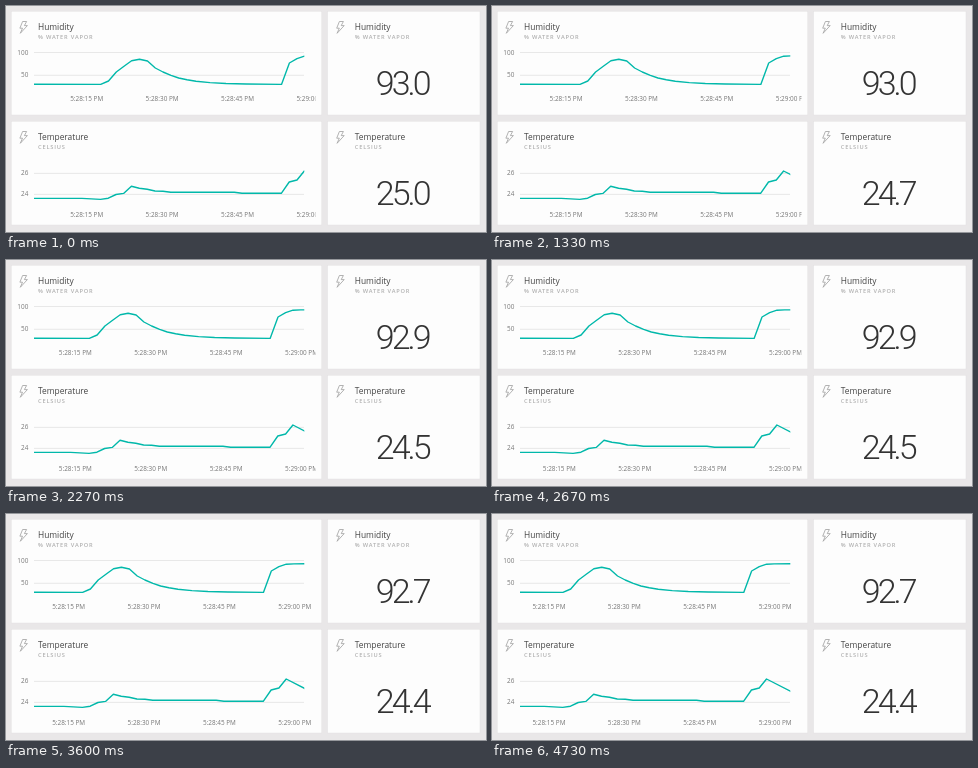
These frames come from a looping animation (480 by 226 pixels, 4.79 s). An HTML page:

```html
<!DOCTYPE html>
<html lang="en">
<head>
<meta charset="utf-8">
<title>Sensor dashboard</title>
<style>
  html, body { margin: 0; width: 100%; height: 100%; overflow: hidden; background: #e9e7e8; }
  svg { display: block; width: 100%; height: 100%; }
  text { font-family: "Open Sans", "Noto Sans", sans-serif; }
  .card { fill: #fdfdfd; stroke: #e2e0e1; stroke-width: .5; }
  .bolt { fill: none; stroke: #a0a0a0; stroke-width: .8; stroke-linejoin: round; }
  .title { font-size: 8.4px; fill: #444; }
  .unit { font-size: 5.7px; font-weight: 600; letter-spacing: .8px; fill: #b0b0b0; }
  .axis { font-size: 6.4px; fill: #777; }
  .grid { stroke: #e4e4e4; stroke-width: .8; }
  .line { fill: none; stroke: #01b8aa; stroke-width: 1.4; stroke-linejoin: round; }
  .value { font: 300 34px Roboto, "Open Sans", sans-serif; letter-spacing: -3px; fill: #333; }
</style>
</head>
<body>
<svg viewBox="0 0 480 226">
  <defs>
    <clipPath id="plot"><rect x="28" y="0" width="270.3" height="226"/></clipPath>
    <clipPath id="labels"><rect x="5" y="0" width="304.5" height="226"/></clipPath>
  </defs>
  <g id="stage"></g>
</svg>
<script>
const LOOP = 4790, FPS = 15, SPEED = 5.02;      // ms, frames/s, px/s
const TICKS = ["5:28:15 PM", "5:28:30 PM", "5:28:45 PM", "5:29:00 PM"];
const VALUE_TIMES = [0, 400, 2000, 3600];       // ms at which readings arrive

const sensors = [
  {
    title: "Humidity", unit: "% WATER VAPOR", top: 5, labelY: 95,
    grid: [["100", 46.5], ["50", 69.3]],
    values: ["93.0", "93.0", "92.9", "92.7"],
    points: "0,78.2 94.7,78.4 102.5,75 110.3,66 118,60.3 125.6,54.8 133.5,53.2 141.5,55 " +
      "149.3,62 157,66 165,69.3 172.7,72 181,73.8 190,75.2 204,76.6 220,77.5 240,78 " +
      "275.5,78.4 283.4,57 291,52.6 298.4,50.2 306,49.9 330,49.7"
  },
  {
    title: "Temperature", unit: "CELSIUS", top: 115, labelY: 211,
    grid: [["26", 167.4], ["24", 188.4]],
    values: ["25.0", "24.7", "24.5", "24.4"],
    points: "0,192.4 76,192.4 94.5,193.4 102.3,192.2 110,188.5 117.6,187.4 125.4,180.3 " +
      "133.3,182.2 141.2,183.2 149,185 157,185.2 164.8,186.2 228.3,186.2 236,187.3 " +
      "275.3,187.3 283.2,176 291,174 298.3,165 330,181.2"
  }
];

const heading = (x, s) => `
  <path class="bolt" transform="translate(${x} ${s.top})"
    d="M11.6 10.5H15.6L13.4 14.6H16.4L9.3 22.3L11.5 17.2H8.9Z"/>
  <text class="title" x="${x + 27}" y="${s.top + 18.7}">${s.title}</text>
  <text class="unit" x="${x + 27}" y="${s.top + 28}">${s.unit}</text>`;

const gridLine = ([label, y]) => `
  <path class="grid" d="M28 ${y}H298"/>
  <text class="axis" x="22.3" y="${y + 2}" text-anchor="end">${label}</text>`;

const tick = (label, i, y) =>
  `<text class="axis" x="${80.7 + i * 75.4}" y="${y}" text-anchor="middle">${label}</text>`;

const cards = s => `
  <rect class="card" x="5.2" y="${s.top + .2}" width="310.6" height="103.8"/>
  <rect class="card" x="321.5" y="${s.top + .2}" width="152.5" height="103.8"/>
  ${heading(5, s)}${heading(321.8, s)}
  ${s.grid.map(gridLine).join("")}
  <g clip-path="url(#plot)"><polyline class="line scroll" points="${s.points}"/></g>
  <g clip-path="url(#labels)"><g class="scroll">
    ${TICKS.map((label, i) => tick(label, i, s.labelY)).join("")}
  </g></g>
  <text class="value" x="396.2" y="${s.top + 83.6}" text-anchor="middle"></text>`;

document.getElementById("stage").innerHTML = sensors.map(cards).join("");
const scrollers = document.querySelectorAll(".scroll");
const readouts = document.querySelectorAll(".value");

function draw() {
  const t = performance.now() % LOOP;
  const seconds = Math.floor((t + 4) * FPS / 1000) / FPS;
  const reading = VALUE_TIMES.filter(start => start <= t).length - 1;
  scrollers.forEach(el => el.setAttribute("transform", `translate(${-SPEED * seconds} 0)`));
  readouts.forEach((el, i) => el.textContent = sensors[i].values[reading]);
  requestAnimationFrame(draw);
}
draw();
</script>
</body>
</html>
```
